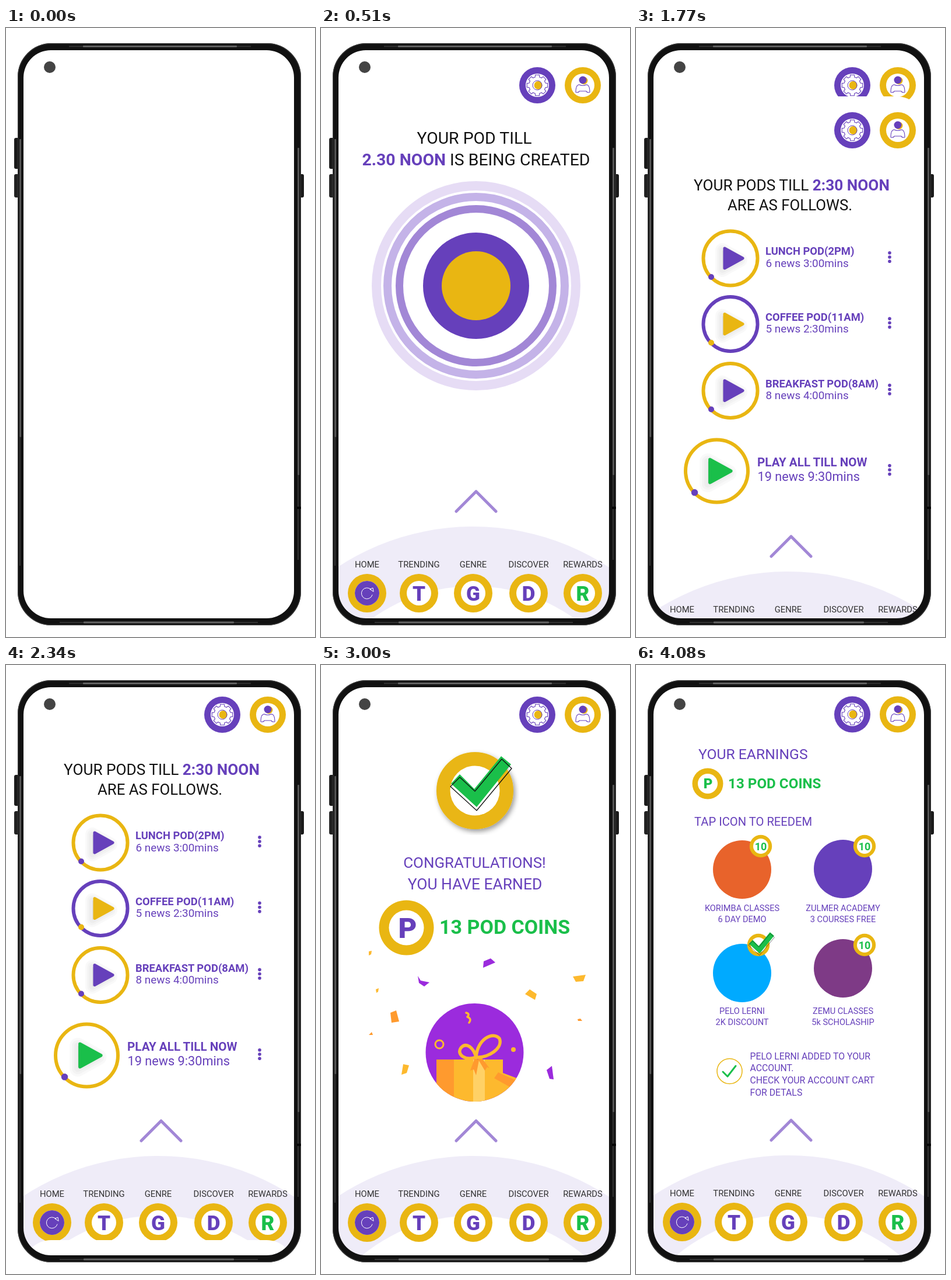
Animation, 530 px wide and 1042 px high, one loop 4.98 s. Source, as an HTML page:

```html
<!DOCTYPE html>
<html lang="en">
<head>
<meta charset="utf-8">
<title>Pod app walkthrough</title>
<style>
html, body { margin: 0; width: 100%; height: 100%; overflow: hidden; background: #fff; }
svg { display: block; width: 530px; height: 1042px; font-family: Roboto, "Open Sans", sans-serif; }
</style>
</head>
<body>
<svg id="stage" viewBox="0 0 530 1042"></svg>
<script>
const PURPLE = '#6640bb', GOLD = '#e9b612', GREEN = '#1abf4a', LILAC = '#a287d6', ORANGE = '#ff9a2e', SUN = '#fdb92e', VIOLET = '#9b2bdd';
const LOOP = 4980, STEP = 30, BOTTOM = 1010;

// --- drawing helpers ---
const disc = (x, y, r, fill) => `<circle cx="${x}" cy="${y}" r="${r}" fill="${fill}"/>`;
const ring = (x, y, r, w, stroke) => `<circle cx="${x}" cy="${y}" r="${r}" fill="none" stroke="${stroke}" stroke-width="${w}"/>`;
const line = (d, stroke, w, fill = 'none') =>
  `<path d="${d}" fill="${fill}" stroke="${stroke}" stroke-width="${w}" stroke-linecap="round" stroke-linejoin="round"/>`;
const shape = (d, fill) => `<path d="${d}" fill="${fill}"/>`;
const bar = (x, y, w, h, fill, r = 0) => `<rect x="${x}" y="${y}" width="${w}" height="${h}" rx="${r}" fill="${fill}"/>`;
const text = (x, y, size, str, fill = PURPLE, weight = 400, anchor = 'start') =>
  `<text x="${x}" y="${y}" font-size="${size}" fill="${fill}" font-weight="${weight}" text-anchor="${anchor}">${str}</text>`;
const mid = (x, y, size, str, fill, weight) => text(x, y, size, str, fill, weight, 'middle');
const bold = str => `<tspan font-weight="700" fill="${PURPLE}">${str}</tspan>`;
const move = (x, y, body) => `<g transform="translate(${x} ${y})">${body}</g>`;
const coin = (x, y, r, inner) => disc(x, y, r, GOLD) + disc(x, y, inner, '#fff');

// --- parts shared by the pages ---
function gear() {
  let d = '';
  for (let i = 0; i < 8; i++) {
    for (const [a, r] of [[-.26, 14.5], [-.19, 18], [.19, 18], [.26, 14.5]]) {
      const angle = i * Math.PI / 4 + a;
      d += (d ? 'L' : 'M') + (r * Math.cos(angle)).toFixed(1) + ' ' + (r * Math.sin(angle)).toFixed(1);
    }
  }
  return line(d + 'Z', PURPLE, 1.1);
}

const header = y =>
  move(371, y, disc(0, 0, 31, PURPLE) + disc(0, 0, 20, '#fff') + gear() + disc(1.5, 0, 7, GOLD) + ring(0, 0, 8, 1, PURPLE)) +
  move(449, y, coin(0, 0, 31, 20) + disc(2, -8, 6.5, GOLD) + disc(0, -9, 6.5, PURPLE) +
    line('M-12 12Q-12-1-6-1Q0 2 6-1Q12-1 12 12Q7 13 6 10H-6Q-7 13-12 12Z', PURPLE, 1.1));

const tabs = [[79, 'HOME', ''], [168, 'TRENDING', 'T'], [261, 'GENRE', 'G'], [356, 'DISCOVER', 'D'], [449, 'REWARDS', 'R']];
const footer = dy => move(0, dy,
  disc(261, 1277, 424, '#efecf8') + disc(261, 1255, 300, '#fff') +
  line('M232 827L266 793L300 827', LILAC, 5) +
  tabs.map(([x, label, key]) => mid(x, 923, 14.8, label, '#333') + coin(x, 967, 33, 21) +
    (key ? mid(x, 980, 35, key, key === 'R' ? GREEN : PURPLE, 900)
         : disc(x, 967, 21, PURPLE) + line('M86 961A9.5 9.5 0 1 0 88 970M84 960L89 958L90 964Z', '#fff', 1))).join(''));

function player(x, y, r, color, dot, play, title, info, tx, sizes, base) {
  const k = r / 46.5, d = `M${-10 * k} ${-17 * k}L${21 * k} 0L${-10 * k} ${17 * k}Z`;
  const shadow = [24, 17, 10].map(w => move(-4, 3, line(d, 'rgba(0,0,0,.025)', w * k, 'rgba(0,0,0,.02)'))).join('');
  return move(x, y, shadow + line(d, play, 5 * k, play) + ring(0, 0, r, 6, color) + disc(-33 * k, 32 * k, 5 * k, dot)) +
    text(tx, base, sizes[0], title, PURPLE, 700) + text(tx + .5, base + sizes[2], sizes[1], info) +
    [-7.3, 0, 7.3].map(o => disc(435, y - 2 + o, 2.8, PURPLE)).join('');
}

// --- pages, drawn where they come to rest ---
const home = header(98) +
  mid(263, 198, 28.4, 'YOUR POD TILL', '#111') +
  mid(266, 235, 28.4, bold('2.30 NOON') + ' IS BEING CREATED', '#111') +
  ring(266, 441, 171, 16, '#e6dcf5') + ring(266, 441, 152, 14, '#c4b3e8') + ring(266, 441, 131.5, 13, LILAC) +
  disc(266, 441, 91, PURPLE) + disc(266, 441, 59, GOLD) + footer(0);

const small = [18.4, 18.9, 20.5];
const pods = header(85) +
  mid(267, 188, 26.2, 'YOUR PODS TILL ' + bold('2:30 NOON'), '#111') +
  mid(264, 221.5, 25.8, 'ARE AS FOLLOWS.', '#111') +
  player(162, 304, 46.5, GOLD, PURPLE, PURPLE, 'LUNCH POD(2PM)', '6 news 3:00mins', 222, small, 298) +
  player(162, 416.5, 46.5, PURPLE, GOLD, GOLD, 'COFFEE POD(11AM)', '5 news 2:30mins', 222, small, 410.5) +
  player(162, 530.5, 46.5, GOLD, PURPLE, PURPLE, 'BREAKFAST POD(8AM)', '8 news 4:00mins', 222, small, 524.5) +
  player(138.5, 668, 53.5, GOLD, PURPLE, GREEN, 'PLAY ALL TILL NOW', '19 news 9:30mins', 208, [20.6, 21.7, 24.5], 660) +
  footer(-13);

const confetti = [
  ['M82 490L87 489L86 495L82 497Z', SUN], ['M166 532L171 540L186 543L177 550L168 544Z', VIOLET],
  ['M279 507L291 502L299 509L278 518Z', VIOLET], ['M94 555L99 553L98 559L95 561Z', SUN],
  ['M119 595L129 591L134 610L121 612Z', ORANGE], ['M350 563L358 555L370 563L367 573Z', SUN],
  ['M432 533L454 530L450 541L437 542Z', SUN], ['M440 606L445 605L448 609L441 609Z', ORANGE],
  ['M82 633L87 628L89 633Z', ORANGE], ['M141 683L151 685L147 698L138 701Z', SUN],
  ['M387 693L396 686L399 709L392 708Z', VIOLET]
].map(p => shape(...p)).join('');

const gift = disc(263.5, 663, 84, VIOLET) + '<g clip-path="url(#round)">' +
  bar(198, 675, 114, 80, SUN) + bar(198, 675, 30, 80, ORANGE) + bar(261, 675, 20, 80, '#ffd166') +
  shape('M312 675V698L336 707L338 716L322 712L336 724L312 742Z', SUN) +
  shape('M304 697L335 711L324 722L297 707Z', ORANGE) + '</g>' +
  shape('M264 672L256 694L262 692L266 702L271 676Z', ORANGE) + shape('M268 672L281 694L285 688L289 690L274 670Z', ORANGE) +
  line('M266 671C247 678 232 666 240 655C250 644 262 656 266 671C268 640 295 626 306 639C313 655 287 673 266 671', SUN, 5.5) +
  line('M249 595Q256 597 251 602Q259 605 254 612', SUN, 3.5) + ring(203, 649, 7, 3, SUN) + disc(330, 658, 4, SUN);

const tick = shape('M223 203L238 187L263 212L309 156L326 170L267 243Z', GREEN) +
  line('M222 208L238 192L264 216L310 161L327 177L267 249Z', '#111', 1.3);
const reward = header(85) +
  `<g filter="url(#soft)">${ring(264, 215, 54, 24, GOLD)}</g>` + disc(264, 215, 42.5, '#fff') + tick +
  mid(263.5, 347, 25.9, 'CONGRATULATIONS!') + mid(264, 384, 26.4, 'YOU HAVE EARNED') +
  coin(146.5, 449.5, 47, 30) + mid(148.5, 467, 49, 'P', PURPLE, 900) +
  text(203, 459.5, 34, '13 POD COINS', GREEN, 700) + confetti + gift + footer(-13);

const offers = [
  [182, 350, '#e8632b', 421, 'KORIMBA CLASSES', '6 DAY DEMO'],
  [355, 349, PURPLE, 421, 'ZULMER ACADEMY', '3 COURSES FREE'],
  [182, 527, '#00aaff', 597, 'PELO LERNI', '2K DISCOUNT'],
  [355, 519, '#7e3a86', 597, 'ZEMU CLASSES', '5k SCHOLASHIP']
].map(([x, y, fill, base, name, deal]) =>
  disc(x, y, 50, fill) + mid(x, base, 14.6, name) + mid(x, base + 18.5, 14.6, deal)).join('');
const badges = [[214, 310], [392, 310], [392, 479]].map(([x, y]) =>
  coin(x, y, 19.2, 13) + mid(x, y + 6.5, 18, '10', GREEN, 700)).join('');
const earnings = header(84.5) +
  text(107, 161, 24.7, 'YOUR EARNINGS') +
  coin(123, 203, 26.5, 17) + mid(123.5, 211, 24, 'P', GREEN, 800) +
  text(158, 211, 24.2, '13 POD COINS', GREEN, 700) +
  text(100, 274.5, 20.2, 'TAP ICON TO REEDEM') + offers + badges +
  coin(210, 479, 19.2, 13) +
  `<g transform="translate(215.5 477) scale(.42) translate(-275 -203)">${tick}</g>` +
  ring(160.5, 695, 21.5, 1.5, GOLD) + line('M149 696L157 704L171 686', GREEN, 3) +
  ['PELO LERNI ADDED TO YOUR', 'ACCOUNT.', 'CHECK YOUR ACCOUNT CART', 'FOR DETALS']
    .map((s, i) => text(195.5, 674.5 + i * 20.8, 15.8, s)).join('') + footer(-14);

// --- phone body ---
const phone =
  bar(14, 188, 9, 53, '#1b1b1b', 3) + bar(14, 250, 9, 40, '#222', 3) + bar(503, 250, 8, 40, '#1b1b1b', 3) +
  `<path fill-rule="evenodd" fill="#111" d="M78 26H448A58 58 0 0 1 506 84V964A58 58 0 0 1 448 1022H78A58 58 0 0 1 20 964V84A58 58 0 0 1 78 26Z
   M77 38A47 47 0 0 0 30 85V963A47 47 0 0 0 77 1010H447A47 47 0 0 0 494 963V85A47 47 0 0 0 447 38Z"/>` +
  '<rect x="20.75" y="26.75" width="484.5" height="994.5" rx="57" fill="none" stroke="#333" stroke-width="1.5"/>' +
  bar(23, 190, 3, 510, '#555', 1) + bar(23, 700, 2, 220, '#333') + bar(500, 205, 3, 560, '#555', 1) + bar(500, 765, 2, 145, '#333') +
  bar(108, 30.5, 312, 2, '#333') + bar(132, 30, 264, 3, '#606060', 1) +
  bar(92, 1016, 340, 2, '#333') + bar(133, 1015.5, 258, 3, '#666', 1) +
  bar(499, 819, 7, 4, '#050505') + disc(75, 67, 10, '#444');

// Each page slides up from the bottom: start, duration, resting top
const pages = [
  { start: 0, time: 515, top: 40, body: home },
  { start: 1238, time: 661, top: 27, body: pods },
  { start: 2263, time: 735, top: 27, body: reward },
  { start: 3435, time: 650, top: 26, body: earnings }
];

const stage = document.getElementById('stage');
stage.innerHTML = `<defs>
  <clipPath id="screen"><rect x="30" y="38" width="464" height="972" rx="47"/></clipPath>
  <clipPath id="round"><circle cx="263.5" cy="663" r="84"/></clipPath>
  <filter id="soft" x="-20%" y="-20%" width="140%" height="140%"><feDropShadow dx="3" dy="4" stdDeviation="4" flood-opacity=".4"/></filter>
  </defs><g clip-path="url(#screen)">` +
  pages.map(p => `<g class="page">${bar(30, p.top, 464, 1060, '#fff', 47)}${p.body}</g>`).join('') + '</g>' + phone;
const layers = stage.querySelectorAll('.page');

function draw() {
  const t = Math.floor(performance.now() % LOOP / STEP) * STEP;
  pages.forEach((p, i) => {
    const k = Math.min(1, Math.max(0, (t - p.start) / p.time));
    const rest = (BOTTOM - p.top) * (1 + Math.cos(Math.PI * k)) / 2;
    layers[i].setAttribute('transform', `translate(0 ${Math.round(rest)})`);
    layers[i].setAttribute('visibility', k > 0 ? 'visible' : 'hidden');
  });
  requestAnimationFrame(draw);
}
draw();
</script>
</body>
</html>
```
